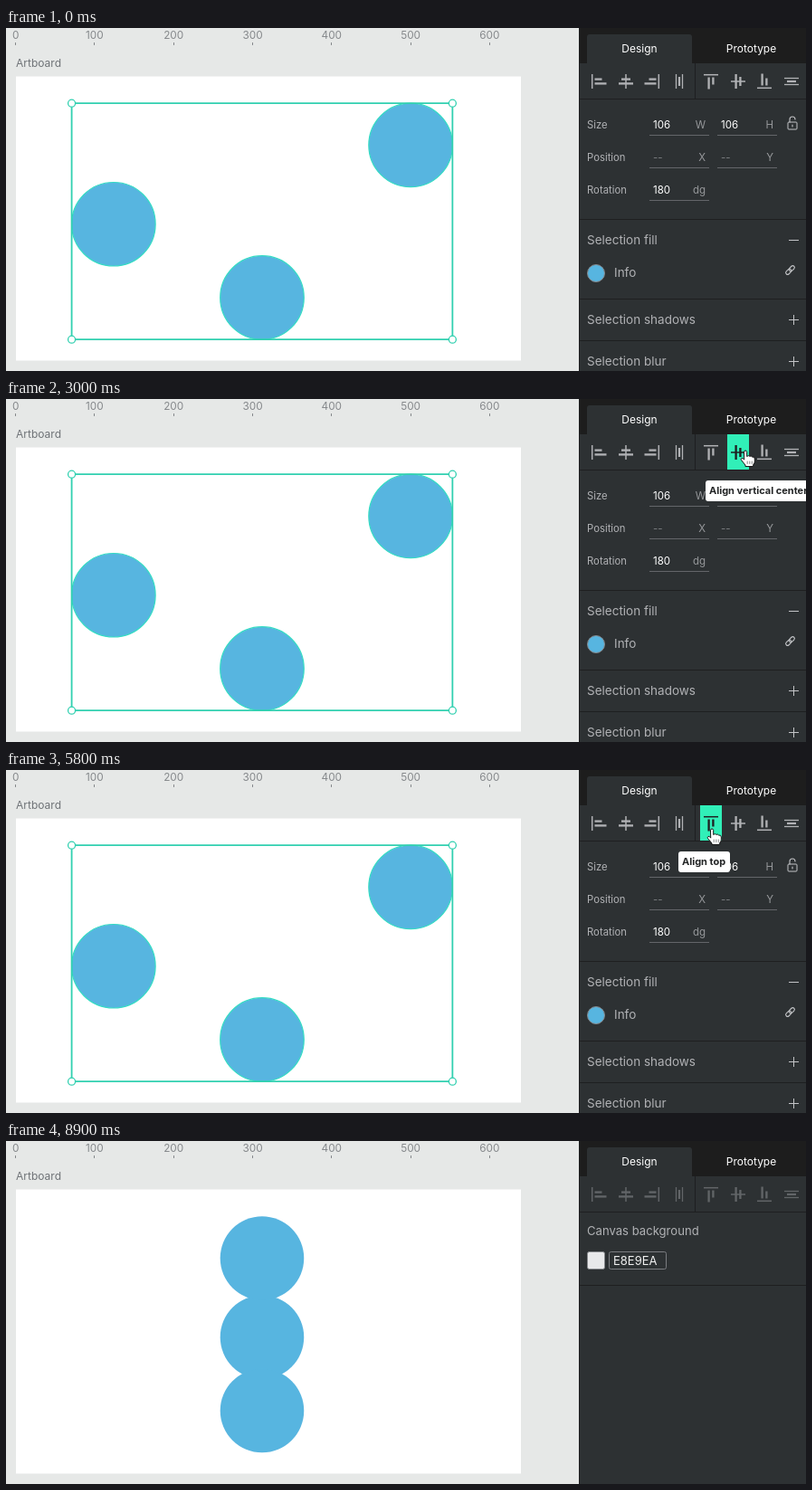
An HTML page with a canvas for the animation above (9.5 s loop, 884 by 379 pixels).

```html
<!DOCTYPE html>
<html lang="en">
<head>
<meta charset="utf-8">
<title>Align shapes</title>
<style>
html, body { margin: 0; width: 100%; height: 100%; overflow: hidden; background: #e6e8e7; }
canvas { display: block; }
</style>
</head>
<body>
<canvas id="stage" width="884" height="379"></canvas>
<script>
const ctx = document.getElementById('stage').getContext('2d');
const LOOP = 9500, STEP = 100, DESELECT = 8600;
const PANEL = '#2d3133', DARK = '#1e1f20', LABEL = '#b1b2b5', RULE = '#64666a', ICON = '#c3c4c7';
const MINT = '#31efb8', FRAME = '#31d0b0', BLUE = '#57b5e0';

// Board units to stage pixels
const SCALE = 0.873, LEFT = 10.6, TOP = 53.5, SIZE = 106;
const toX = u => LEFT + u * SCALE;
const toY = u => TOP + u * SCALE;

const shapes = [{ x: 71, y: 134 }, { x: 259, y: 227 }, { x: 447, y: 34 }];
const middle = list => (Math.min(...list) + Math.max(...list)) / 2;
const first = list => Math.min(...list);

// The tooltip shows from hover to leave, the alignment from apply to undo
const actions = [
  { hover: 1300, leave: 3600, apply: 1600, undo: 3000, axis: 'y', rule: middle,
    x: 773, w: 124, label: 'Align vertical center' },
  { hover: 3900, leave: 6300, apply: 4300, undo: 5800, axis: 'y', rule: first,
    x: 743, w: 57, label: 'Align top' },
  { hover: 7000, leave: 8300, apply: 7200, undo: LOOP, axis: 'x', rule: middle,
    x: 649, w: 132, label: 'Align horizontal center' }
];

const enter = { start: 700, x: 732, y: 60 };
const moves = [
  { start: 700, time: 300, x: 817, y: 57 },
  { start: 3500, time: 200, x: 776, y: 60 },
  { start: 5400, time: 200, x: 780, y: 65 },
  { start: 6200, time: 600, x: 673, y: 55 },
  { start: 6900, time: 100, x: 679, y: 55 },
  { start: 8200, time: 600, x: 47, y: 12 }
];

const clamp = v => Math.max(0, Math.min(1, v));

function text(str, x, y, size, color, align = 'left', weight = 400) {
  ctx.font = `${weight} ${size}px Inter, sans-serif`;
  ctx.textAlign = align;
  ctx.fillStyle = color;
  ctx.fillText(str, x, y);
}

function rect(x, y, w, h, color) {
  ctx.fillStyle = color;
  ctx.fillRect(x, y, w, h);
}

function paint(fill, stroke, width) {
  if (fill) { ctx.fillStyle = fill; ctx.fill(); }
  if (stroke) { ctx.strokeStyle = stroke; ctx.lineWidth = width; ctx.stroke(); }
}

function disc(x, y, r, fill, stroke, width = 1) {
  ctx.beginPath();
  ctx.arc(x, y, r, 0, Math.PI * 2);
  paint(fill, stroke, width);
}

function box(x, y, w, h, r, fill, stroke, width = 1) {
  ctx.beginPath();
  ctx.roundRect(x, y, w, h, r);
  paint(fill, stroke, width);
}

function shape(d, fill, stroke, width, x = 0, y = 0) {
  const p = new Path2D(d);
  ctx.save();
  ctx.translate(x, y);
  ctx.lineJoin = ctx.lineCap = 'round';
  if (fill) { ctx.fillStyle = fill; ctx.fill(p); }
  if (stroke) { ctx.strokeStyle = stroke; ctx.lineWidth = width; ctx.stroke(p); }
  ctx.restore();
}

function pointerAt(t) {
  const last = moves[moves.length - 1];
  if (t < enter.start || t > last.start + last.time) return null;
  let { x, y } = enter;
  for (const m of moves) {
    const k = clamp((t - m.start) / m.time);
    x += (m.x - x) * k;
    y += (m.y - y) * k;
  }
  return { x, y };
}

function place(action) {
  if (!action) return shapes;
  const { axis, rule } = action;
  return shapes.map(s => ({ ...s, [axis]: rule(shapes.map(o => o[axis])) }));
}

function drawBoard(placed, selected) {
  rect(0, 0, 633, 379, '#e6e8e7');
  for (let u = 0; u <= 600; u += 100) {
    text(String(u), toX(u), 12, 11.8, '#85888b', 'center');
    rect(Math.floor(toX(u)), 16, 1, 3, '#85888b');
  }
  text('Artboard', 11, 43, 12, '#6f7377');
  rect(11, TOP, 558, 314, '#fff');

  const half = SIZE / 2;
  const each = (...style) => {
    for (const s of placed) disc(toX(s.x + half), toY(s.y + half), half * SCALE, ...style);
  };
  each(BLUE);
  if (!selected) return;

  each(null, '#35dcc4', 1.2);
  const xs = placed.map(s => s.x), ys = placed.map(s => s.y);
  const left = toX(Math.min(...xs)), right = toX(Math.max(...xs) + SIZE);
  const top = toY(Math.min(...ys)), bottom = toY(Math.max(...ys) + SIZE);
  box(left, top, right - left, bottom - top, 0, null, FRAME, 1.8);
  for (const x of [left, right])
    for (const y of [top, bottom]) disc(x, y, 4, '#fff', FRAME, 1.3);
}

// side: -1 start, 0 center, 1 end, 2 distribute; vertical icons are turned
function alignIcon(cx, side, vertical, color) {
  ctx.save();
  ctx.translate(cx, 59);
  if (vertical) ctx.rotate(Math.PI / 2);
  const bar = (x, y, w, h) => rect(x - w / 2, y - h / 2, w, h, color);
  if (side === 2) {
    bar(-3.5, 0, 1.3, 16);
    bar(0, 0, 2.2, 10);
    bar(3.5, 0, 1.3, 16);
  } else {
    bar(7.3 * side, 0, 1.5, 16);
    const long = side ? 13 : 16, short = side ? 8 : 10;
    bar(side * (4.5 - short / 2), -2.4, short, 2.3);
    bar(side * (4.5 - long / 2), 2.4, long, 2.3);
  }
  ctx.restore();
}

function drawToolbar(selected, pointer) {
  rect(633, 0, 251, 379, PANEL);
  rect(633, 0, 251, 39, '#1d1d1d');
  rect(633, 0, 1, 379, DARK);
  box(642, 7, 116, 33, [3, 3, 0, 0], PANEL);
  text('Design', 700, 27, 12, '#fff', 'center');
  text('Prototype', 823.5, 27, 12, '#fff', 'center');
  rect(633, 78, 251, 1, DARK);
  rect(761, 39, 1, 39, DARK);
  for (let i = 0; i < 8; i++) {
    const vertical = i > 3;
    const cx = Math.round(655 + 29.5 * i + (vertical ? 6 : 0));
    const hover = selected && pointer && Math.abs(pointer.x - cx) <= 12 &&
      pointer.y > 39 && pointer.y < 78;
    if (hover) rect(cx - 12, 39, 24, 39, MINT);
    alignIcon(cx, i % 4 - 1, vertical, hover ? DARK : selected ? LABEL : '#626568');
  }
}

function field(x, y, value, unit) {
  text(value, x + 4, y, 11.5, value === '--' ? '#7b7d81' : '#fff');
  text(unit, x + 62, y, 11.5, '#96989b', 'right');
  rect(x, y + 7, 66, 1, RULE);
}

function section(label, y, open) {
  rect(633, y - 28, 251, 1, DARK);
  text(label, 642, y, 13.5, LABEL);
  rect(865, y - 5, 11, 1, ICON);
  if (!open) rect(870, y - 10, 1, 11, ICON);
}

function drawLink(x, y) {
  ctx.save();
  ctx.translate(x, y);
  ctx.rotate(-Math.PI / 4);
  for (const left of [-6, -1]) box(left, -2, 7, 4, 2, null, ICON, 1.1);
  ctx.restore();
}

function drawSelectionPanel(action, placed) {
  const value = axis => action && action.axis === axis ? String(placed[0][axis]) : '--';
  const rows = [
    ['Size', [SIZE, 'W'], [SIZE, 'H']],
    ['Position', [value('x'), 'X'], [value('y'), 'Y']],
    ['Rotation', [180, 'dg']]
  ];
  rows.forEach(([label, ...fields], i) => {
    const y = 111 + 36 * i;
    text(label, 642, y, 11.3, LABEL);
    fields.forEach(([v, unit], j) => field(711 + 75 * j, y, v, unit));
  });

  // open padlock
  box(864, 104, 10, 8, 1, null, ICON);
  shape('M866 104V101a3 3 0 0 1 6 0M869 107v2', null, ICON, 1.1);

  section('Selection fill', 239, true);
  disc(652, 271, 9.5, BLUE, '#85888b');
  text('Info', 672, 275, 13.5, LABEL);
  drawLink(866.5, 267.5);
  section('Selection shadows', 327);
  section('Selection blur', 373);
}

function drawCanvasPanel() {
  text('Canvas background', 642, 104, 13.1, LABEL);
  box(642.5, 122.5, 19, 19, 2, '#e8e9ea', '#85888b');
  box(666.5, 122.5, 63, 19, 2, null, '#7b7d81');
  text('E8E9EA', 671, 137, 13, '#f0f0f0');
  rect(633, 159, 251, 1, DARK);
}

function drawTip(t) {
  const tip = actions.find(a => t >= a.hover && t < a.leave);
  if (!tip) return;
  ctx.globalAlpha = clamp(0.22 + (t - tip.hover) / 455);
  box(tip.x, 90, tip.w, 23, 3, '#fff');
  ctx.globalAlpha = 1;
  text(tip.label, tip.x + 4, 105, 11, '#232526', 'left', 700);
}

function drawPointer({ x, y }) {
  if (x < 633) {
    shape('M0 0V14L3.4 11L5.7 16L8 15L5.7 10.2H10Z', '#111', '#fff', 1, x, y);
    return;
  }
  shape('M-1.5 1.5Q-1.5 0 0 0T1.7 1.5V6.5Q3.5 4.8 4.7 6.3' +
    'Q6.5 5.5 7.5 7Q10.3 6.6 10.3 9V12Q10.3 14 8.7 15.5V17.5H0V16' +
    'L-4.5 10.5Q-5.3 9 -4 8.4T-1.5 9.8Z', '#fff', '#151515', 1, x, y);
  shape('M2.2 12v2.5M4.8 12v2.5M7.3 12v2.5', null, '#555', 0.7, x, y);
}

function draw(now) {
  const t = Math.floor((now % LOOP) / STEP) * STEP;
  const action = actions.find(a => t >= a.apply && t < a.undo);
  const placed = place(action);
  const selected = t < DESELECT;
  const pointer = pointerAt(t);
  drawBoard(placed, selected);
  drawToolbar(selected, pointer);
  if (selected) drawSelectionPanel(action, placed);
  else drawCanvasPanel();
  drawTip(t);
  if (pointer) drawPointer(pointer);
}

const begin = performance.now();
function tick() {
  draw(performance.now() - begin);
  requestAnimationFrame(tick);
}
tick();
</script>
</body>
</html>
```
